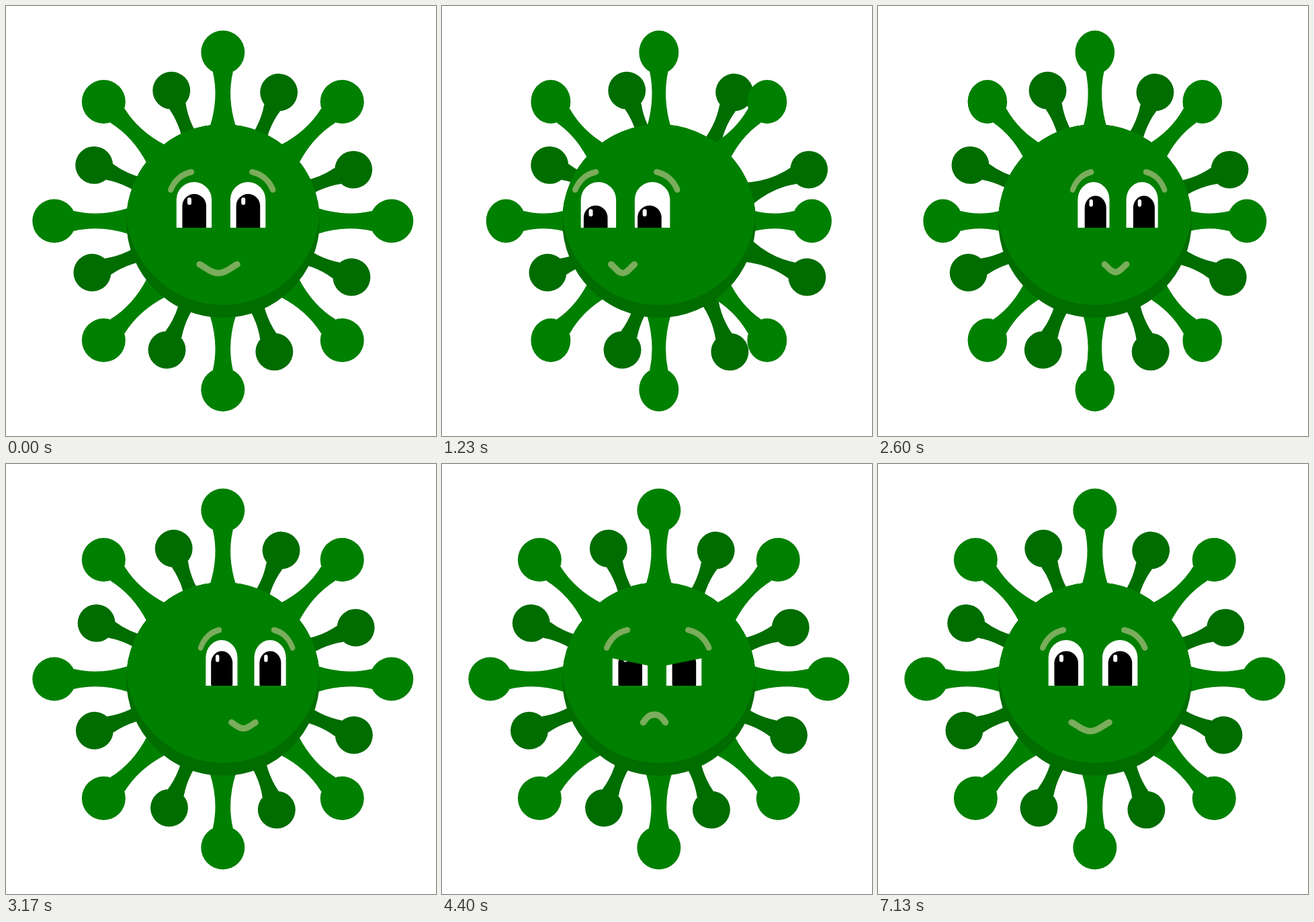
Write an HTML page that moves like this. It is 640 px wide and 640 px high and loops after 7.16 s.

```html
<!DOCTYPE html>
<html lang="en">
<head>
<meta charset="utf-8">
<title>Virus</title>
<style>
  html, body { margin: 0; width: 100%; height: 100%; overflow: hidden; background: #fff; }
  svg { display: block; width: 100%; height: 100%; }
</style>
</head>
<body>
<svg viewBox="0 0 640 640">
  <defs>
    <g id="spike">
      <circle cy="-251" r="32.5"/>
      <path d="M-15 -222Q-5.8 -183 -19.5 -140H19.5Q5.8 -183 15 -222Z"/>
    </g>
    <clipPath id="bodyClip"><circle cx="323" cy="320" r="144"/></clipPath>
    <path id="eye" d="M-26.2 330V288.2a26.2 26.2 0 0 1 52.4 0V330Z"/>
    <clipPath id="eyeClip"><use href="#eye"/></clipPath>
    <g id="pupil">
      <path d="M-17.8 296.3a17.8 17.8 0 0 1 35.6 0V327.5a4 4 0 0 1 -4 4H-13.8a4 4 0 0 1 -4 -4Z"/>
      <rect x="-10.2" y="283.7" width="6" height="11" rx="3" fill="#fff"/>
    </g>
  </defs>
  <g id="back" fill="#006d00"></g>
  <g id="front" fill="#008000"></g>
  <circle cx="323" cy="320" r="144" fill="#006d00"/>
  <circle cx="323" cy="301" r="144" fill="#008000" clip-path="url(#bodyClip)"/>
  <path d="M179 320a144 144 0 0 1 288 0L466.500 308H179.500Z" fill="#008000"/>
  <g id="face">
    <g id="eyes"></g>
    <g fill="none" stroke="#7aad5c" stroke-linecap="round">
      <path stroke-width="8.500" d="M245.200 273.500Q254 252 276 247M366.300 247Q388.300 252 397.200 273.500"/>
      <path id="mouth" stroke-width="9.500"/>
    </g>
  </g>
</svg>
<script>
const LOOP = 7160;
const byId = id => document.getElementById(id);

// Keyframes as [ms, value]
const tracks = {
  front: [[630, 1], [1230, .907], [1500, .907], [2060, .983], [2560, .9], [3130, 1]],
  back: [[630, 0], [1230, 29], [1700, 29], [2820, 4]],
  faceX: [[630, 0], [1230, -47], [1750, -47], [2600, 37], [3200, 37], [4050, 0]],
  faceY: [[5200, 0], [5720, -26], [5800, -26], [6430, 0]],
  faceScale: [[1750, 1], [2600, .9], [3200, .9], [4050, 1]],
  pupilX: [[800, 0], [1230, -4.5], [1500, -4.5], [1980, 13], [2150, 13], [2800, 0]],
  pupilY: [[630, 1.3], [1230, 18.5], [2150, 18.5], [2800, 0]],
  lidOuter: [[3400, 260], [4050, 289], [5000, 289], [5600, 280], [6000, 280], [6430, 260]],
  lidInner: [[3400, 260], [4050, 300], [5000, 300], [5600, 280], [6000, 280], [6430, 260]],
  mouthWidth: [[630, 28], [1200, 17.3], [2200, 17.3], [3170, 20], [4100, 16.500], [5000, 16.500], [5600, 17]],
  mouthDepth: [[2200, 13], [3170, 9], [4100, -11.5], [5000, -11.5], [5600, 13]]
};

const ease = u => (1 - Math.cos(Math.PI * u)) / 2;
const ramp = (t, a, b) => Math.min(1, Math.max(0, (t - a) / (b - a)));

function valueAt(keys, t) {
  const next = keys.findIndex(key => key[0] > t);
  if (next === 0) return keys[0][1];
  if (next < 0) return keys[keys.length - 1][1];
  const [t0, v0] = keys[next - 1], [t1, v1] = keys[next];
  return v0 + (v1 - v0) * ease((t - t0) / (t1 - t0));
}

for (let i = 0; i < 8; i++) {
  const spike = (angle, extra = '') => `<use href="#spike" transform="rotate(${angle})${extra}"/>`;
  byId('front').innerHTML += spike(45 * i);
  byId('back').innerHTML += spike(45 * i + 23.5, ' translate(0 6.9) scale(.86)');
}

// The right eye's lid slopes the other way
const eyes = [[279.9, 1], [360.1, -1]].map(([x, side]) => {
  byId('eyes').insertAdjacentHTML('beforeend', `<g transform="translate(${x} 0)">
    <use href="#eye" fill="#fff"/>
    <g clip-path="url(#eyeClip)"><use class="pupil" href="#pupil"/></g>
    <path class="lid" fill="#008000"/></g>`);
  const group = byId('eyes').lastElementChild;
  return { side, pupil: group.querySelector('.pupil'), lid: group.querySelector('.lid') };
});

function mouthPath(w, d) {
  const bend = d * (.35 + .4 * ramp(-d, 0, 11.5));
  return `M${-w} 0C${-.65 * w} ${bend} ${-.4 * w} ${d} 0 ${d}S${.65 * w} ${bend} ${w} 0`;
}

function draw(t) {
  const v = {};
  for (const name in tracks) v[name] = valueAt(tracks[name], t);
  const back = v.back - 4 * ramp(t, 2820, 5400);
  const mouthWidth = v.mouthWidth + 11 * ramp(t, 5600, 7130);

  byId('front').setAttribute('transform', `translate(322.8 320) scale(${v.front} 1)`);
  byId('back').setAttribute('transform', `translate(${322.8 + back} 320.200)`);
  byId('face').setAttribute('transform',
    `translate(${320 + v.faceX} ${v.faceY}) scale(${v.faceScale} 1) translate(-320 0)`);

  for (const { side, pupil, lid } of eyes) {
    pupil.setAttribute('transform', `translate(${v.pupilX + .3} ${v.pupilY})`);
    lid.setAttribute('d', v.lidOuter > 260.5
      ? `M${-27 * side} 260V${v.lidOuter}L${27 * side} ${v.lidInner}V260Z` : '');
  }
  byId('mouth').setAttribute('d', mouthPath(mouthWidth, v.mouthDepth));
  byId('mouth').setAttribute('transform', 'translate(316.100 384.600)');
}

const start = performance.now();
function tick() {
  draw((performance.now() - start) % LOOP);
  requestAnimationFrame(tick);
}
tick();
</script>
</body>
</html>
```
